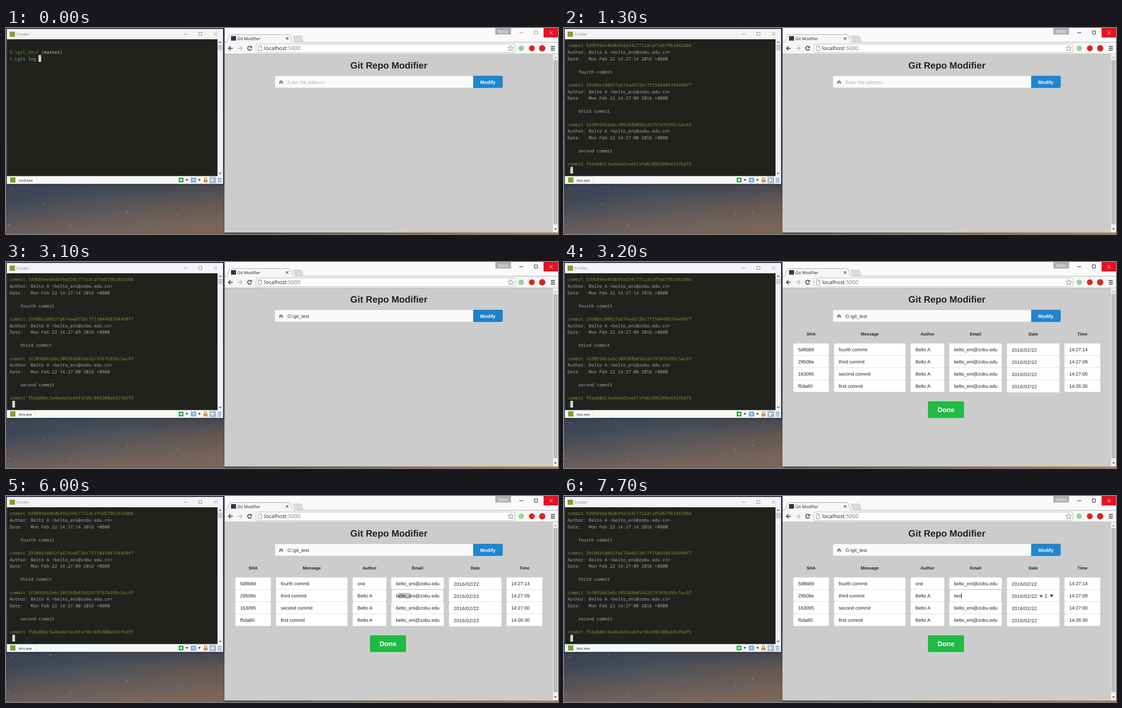
These frames come from a looping animation (1224x457 px, 8000 ms). An HTML page:

```html
<!DOCTYPE html>
<html lang="en">
<head>
<meta charset="utf-8">
<title>Git Repo Modifier</title>
<style>
html, body { margin: 0; width: 100%; height: 100%; overflow: hidden; background: #ccc; }
svg { display: block; --bg: #20221d; --path: #6b9c1c; --bright: #cfcfcb; --cmd: #9d9d99; --log: #a6a6a2; --hash: #868a35; --title: #8c8c90; --btn: #8a8a8e; --bar: #f6f2f5; --web: #8e8e8e; }
svg.term { --bg: #272822; --path: #86cb17; --bright: #f8f8f2; --cmd: #bcbcb6; --log: #c6c6c0; --hash: #a3a632; --title: #222; --btn: #111; --bar: #fff; }
svg.web { --web: #111; }
text { text-rendering: geometricPrecision; white-space: pre; }
.mono { font: 9.75px "Noto Sans Mono", "DejaVu Sans Mono", monospace; }
.ui { font-family: "Open Sans", "Noto Sans", sans-serif; }
.page { font: 10.5px "Liberation Sans", Arial, sans-serif; fill: #222; }
.b { font-weight: bold; }
.mid { text-anchor: middle; }
.line { fill: none; stroke-width: 1; }
.cell { fill: #fff; stroke: #dcdcdc; }
.cell.focus { stroke: #85b7d9; }
.shade { fill: #000; opacity: .3; filter: blur(2px); }
.term .shade { opacity: .6; filter: blur(5px); }
</style>
</head>
<body>
<svg id="stage" width="1224" height="457" viewBox="0 0 1224 457">
  <defs>
    <linearGradient id="sky">
      <stop offset="0" stop-color="#3e4655"/><stop offset=".17" stop-color="#484f59"/>
      <stop offset=".4" stop-color="#55504f"/><stop offset=".7" stop-color="#8a7354"/><stop offset="1" stop-color="#b8944f"/>
    </linearGradient>
    <linearGradient id="dusk" x2="0" y2="1">
      <stop offset="0" stop-color="#20254a"/><stop offset=".75" stop-color="#323a52"/><stop offset="1" stop-color="#323a52" stop-opacity="0"/>
    </linearGradient>
    <linearGradient id="glow" x2=".25" y2="1">
      <stop offset=".3" stop-color="#a07a62" stop-opacity="0"/><stop offset="1" stop-color="#a07a62" stop-opacity=".5"/>
    </linearGradient>
  </defs>

  <!-- wallpaper -->
  <rect width="1224" height="457" fill="url(#sky)"/>
  <rect width="1224" height="380" fill="url(#dusk)"/>
  <rect y="346" width="485" height="111" fill="url(#glow)"/>
  <g id="stars" fill="#c9b58c"></g>

  <!-- browser window -->
  <rect x="484" y="-4" width="742" height="458" fill="#000" opacity=".3" style="filter:blur(2px)"/>
  <rect x="484.5" y="0" width="740" height="453.5" fill="#fafafa"/>
  <path d="M485 31.5H488Q490 31 491 28L495 17Q496 14.5 498.500 14.500H627Q629.500 14.500 630.500 17L635 28Q636 31.500 638 31.500H1224V58H485Z" fill="#f6f6f6"/>
  <path class="line" stroke="#a6a6a6" d="M485 31.5H488Q490 31 491 28L495 17Q496 14.5 498.500 14.500H627Q629.500 14.500 630.500 17L635 28Q636 31.500 638 31.500H1224"/>
  <path d="M636 17.500H653Q655 17.500 656 20L659 29.500H642Q640 29.500 639 27Z" fill="#d6dce0" stroke="#b9bfc3" stroke-width=".8"/>
  <rect x="499" y="18" width="11" height="10" fill="#27394d"/>
  <text class="ui" x="513" y="26.500" font-size="9.2" fill="#222">Git Modifier</text>
  <path class="line" stroke="#555" d="M620.500 20.500L626 26M626 20.500L620.500 26" style="stroke-width:1.3"/>

  <rect x="1085" width="35" height="14.500" fill="#b0b0b0"/>
  <text class="ui mid" x="1102.500" y="11" font-size="9" fill="#fff">Belto</text>
  <path class="line" d="M1138 10.500H1147M1171.500 6.500H1178.500V13.500H1171.500Z" style="stroke:var(--web)"/>
  <rect x="1192" width="32" height="21" fill="#e81123"/>
  <path class="line" stroke="#fff" d="M1205 7L1212 14M1212 7L1205 14"/>

  <path class="line" stroke="#505050" d="M503 45H493.500M498 40.500L493.300 45L498 49.500" style="stroke-width:2"/>
  <path class="line" stroke="#c4c4c4" d="M514 45H523.500M519 40.500L523.700 45L519 49.500" style="stroke-width:2"/>
  <path class="line" stroke="#505050" d="M543.500 42A4.300 4.300 0 1 0 544.300 46.500" style="stroke-width:2"/>
  <path d="M545.500 39.500V44.500H540.500Z" fill="#505050"/>
  <rect x="554.500" y="35.500" width="574" height="19" rx="2" fill="#fff" stroke="#b4b4b4"/>
  <path d="M559.500 39.500H564.500L567.500 42.500V50.500H559.500ZM564.500 39.500V42.500H567.500" fill="#fff" stroke="#808080" stroke-width=".9"/>
  <text class="ui" x="572.500" y="49.300" font-size="11.9" fill="#222">localhost<tspan fill="#777">:5000</tspan></text>
  <path id="star" class="line" stroke="#777"/>
  <circle cx="1142.500" cy="45" r="6" fill="#8fd694"/>
  <circle cx="1166" cy="45" r="6.500" fill="#e2231a"/>
  <circle cx="1189" cy="45" r="7" fill="#d9261c"/>
  <path class="line" stroke="#505050" d="M1208 41H1217M1208 45H1217M1208 49H1217" style="stroke-width:2"/>

  <!-- page -->
  <rect x="485" y="58" width="728" height="395" fill="#ccc"/>
  <path class="line" stroke="#b6b6b6" d="M485 57.500H1224"/>
  <rect x="1213" y="58" width="11" height="395" fill="#f1f1f1"/>
  <rect x="1214" y="71" width="9" height="364.500" fill="#bdbdbd"/>
  <path d="M1215.500 67H1221.500L1218.500 63.500Z" fill="#a0a0a0"/>
  <path d="M1215.500 444.500H1221.500L1218.500 448Z" fill="#505050"/>
  <g class="page">
    <text class="b mid" x="849" y="90" font-size="20.500">Git Repo Modifier</text>
    <path d="M1036 106.500H599Q596.500 106.500 596.500 109V130Q596.500 132.500 599 132.500H1036Z" fill="#fafafa" stroke="#dcdcdc"/>
    <path d="M605 120L610 115.500L615 120L614 120.700V124H611.200V121H608.800V124H606V120.700Z" fill="#888"/>
    <text id="address" x="624" y="123.500"></text>
    <path id="modify" d="M1036 106H1098Q1101.500 106 1101.500 109.500V129.500Q1101.500 133 1098 133H1036Z"/>
    <text class="b mid" x="1068.500" y="123.500" fill="#fff">Modify</text>
    <g id="table" data-on="3200 8000"></g>
    <g id="carets" fill="#111"></g>
  </g>

  <!-- console window -->
  <rect class="shade" x="1" y="4" width="482" height="344"/>
  <rect x="1.500" y="2" width="480" height="344" fill="#f7f7f6" stroke="#55597a" stroke-width=".6"/>
  <rect x="2" y="2.500" width="479" height="22.500" style="fill:var(--bar)"/>
  <rect x="8" y="8" width="12" height="11.500" fill="#7fa12b"/>
  <text class="ui" x="23" y="16.800" font-size="9.2" style="fill:var(--title)">Cmder</text>
  <path class="line" d="M394 13.500H402M427.500 9.500H434.500V16.500H427.500ZM461 9.500L468.500 17M468.500 9.500L461 17" style="stroke:var(--btn)"/>
  <rect x="2" y="25" width="467" height="303.500" style="fill:var(--bg)"/>
  <rect x="469" y="25" width="12" height="303.500" fill="#f0f0f0"/>
  <rect x="470" y="37" width="10.500" height="12.500" fill="#cdcdcd"/>
  <path class="line" stroke="#505050" d="M472.500 33L475 30.500L477.500 33M472.500 321L475 323.500L477.500 321" style="stroke-width:1.4"/>
  <g id="prompt" class="mono" data-on="0 700"></g>
  <g id="log" class="mono" data-on="700 8000"></g>
  <g id="cursors"></g>

  <!-- status bar -->
  <path data-on="0 700" d="M4.500 329V345.500H67.500V330.500H4.500" fill="#fff" stroke="#dcdcdc"/>
  <path data-on="700 8000" d="M4.500 329V345.500H64V330.500H4.500" fill="#fff" stroke="#dcdcdc"/>
  <rect x="9" y="331.500" width="12" height="11.500" fill="#7fa12b"/>
  <text class="ui" id="task" x="28" y="340.700" font-size="8.1" fill="#111"></text>
  <rect x="383" y="332" width="10.500" height="10.500" rx="1" fill="#23a338"/>
  <path class="line" stroke="#fff" d="M385 337.200H391.500M388.200 334V340.500" style="stroke-width:2"/>
  <path d="M398.500 335.500H404L401.200 339ZM426.200 335.500H431.800L429 339Z" fill="#111"/>
  <rect x="410.500" y="332.500" width="10.500" height="9.500" fill="#8fbbe0" stroke="#5b8fc0"/>
  <path class="line" stroke="#fff" d="M414.500 335.500H416V340"/>
  <path class="line" stroke="#a8843a" d="M440 337V334.500A2.500 2.500 0 0 1 445 334.500V337" style="stroke-width:1.4"/>
  <rect x="438" y="336.500" width="9" height="6" fill="#c79a42"/>
  <rect x="451.500" y="330.500" width="14" height="13.500" fill="#cfe4f5" stroke="#8fb8dc"/>
  <path d="M454 333.500H463.500V341.500H454ZM460.500 333.500V341.500" fill="#fff" stroke="#666"/>
  <path class="line" stroke="#2f86c6" d="M469 333.500H478M469 337.500H478M469 341.500H478" style="stroke-width:1.6"/>
</svg>
<script>
const LOOP = 8000;
const $ = id => document.getElementById(id);
const stage = $('stage');
const NAME = 'Belto A', MAIL = 'belto_eni@zobu.edu';

function add(parent, tag, attrs, text) {
  const el = document.createElementNS('http://www.w3.org/2000/svg', tag);
  for (const k in attrs) el.setAttribute(k, attrs[k]);
  if (text) el.textContent = text;
  parent.appendChild(el);
  return el;
}

// Console rows are 14.6 px apart, characters 5.85 px wide.
const row = (box, n, text, color, col = 0) =>
  add(box, 'text', { x: 8 + col * 5.85, y: 42.4 + n * 14.6, style: `fill:var(--${color})` }, text);

row($('prompt'), 1, 'G:\\git_test', 'path');
row($('prompt'), 1, '(master)', 'bright', 12);
row($('prompt'), 2, 'λ', 'c').style.fill = '#75756c';
row($('prompt'), 2, 'cgit log', 'cmd', 2);

[['5d9b89ee46db49a534c771a3caf5eb79b1842dbb', '14', 'fourth'],
 ['29508e18092fa674add726c7f1504488764490f7', '09', 'third'],
 ['163095662e6c309388b05b62679767b395c5ac6f', '00', 'second'],
 ['f5da80dc3a46e4d1ee6fafd6c086300a692fbbf5']].forEach(([sha, sec, nth], i) => {
  const n = i * 6, log = $('log');
  row(log, n, 'commit ' + sha, 'hash');
  if (!nth) return row(log, n + 1, ':', 'log');
  row(log, n + 1, `Author: ${NAME} <${MAIL}.cn>`, 'log');
  row(log, n + 2, `Date:   Mon Feb 22 14:27:${sec} 2016 +0800`, 'log');
  row(log, n + 4, `    ${nth} commit`, 'log');
});

const bar = (box, x, y, w, h, fill, on) =>
  add(box, 'rect', { x, y, width: w, height: h, fill, 'data-on': on });

const cursors = $('cursors');
bar(cursors, 72, 60, 6, 15, '#cfcfcb', '0 200');
bar(cursors, 72, 60, 1, 15, '#fff', '200 600');
bar(cursors, 8, 75, 1.3, 14, '#fff', '600 700');
bar(cursors, 14, 308, 1.2, 15, '#fff', '700 1100');
bar(cursors, 14, 308, 6, 15, '#d4d4d0', '1300 8000');

// Commit table
const table = $('table');
const columns = [
  ['SHA', 508.5, 79, ['5d9b89', '29508e', '163095', 'f5da80']],
  ['Message', 598.5, 159, ['fourth commit', 'third commit', 'second commit', 'first commit']],
  ['Author', 768.5, 75, Array(4).fill(NAME)],
  ['Email', 854, 117, Array(4).fill(MAIL)],
  ['Date', 982, 117, Array(4).fill('2016/02/22')],
  ['Time', 1109.5, 80, ['14:27:14', '14:27:09', '14:27:00', '14:26:30']]
];
const cells = columns.map(([head, x, w, list]) => {
  const date = head === 'Date';
  add(table, 'text', { x: x + w / 2, y: 163.3, class: 'b mid', 'font-size': 9.45 }, head);
  return list.map((value, i) => {
    const y = 180.5 + 27 * i;
    const box = add(table, 'rect', { x, y, width: w, height: date ? 28 : 27, rx: 3, class: 'cell' });
    const marks = add(table, 'g', {});
    const text = add(table, 'text', { x: x + 10.7, y: y + (date ? 18.3 : 17.6) }, value);
    if (date) text.style.letterSpacing = '.36px';
    return { box, marks, text };
  });
});
const author = cells[2][0], email = cells[3][1];

bar(author.marks, 779, 188, 20, 12, '#c4c4c4', '3900 4000');
bar(author.marks, 779, 188, 34, 12, '#c4c4c4', '4000 4800');
bar(email.marks, 869.5, 215, 28.5, 12, '#c4c4c4', '6000 6100');
bar(email.marks, 865, 215, 95.5, 12, '#c4c4c4', '6100 6700');

function dateTools(y, on) {
  const g = add(table, 'g', { 'data-on': on });
  add(g, 'path', { d: `M1055.500 ${y - 2.5}l5 5m0 -5l-5 5`, stroke: '#3a62a0', 'stroke-width': 1.8 });
  add(g, 'path', { d: `M1066 ${y - 1.3}h5.600l-2.800 -3zm0 2.600h5.600l-2.800 3z`, fill: '#555' });
  add(g, 'path', { d: `M1077.500 ${y - 3}h7.500l-3.750 5.500z`, fill: '#111' });
}
dateTools(222, '6300 7600 7700 8000');
dateTools(249, '7600 7700');

add(table, 'rect', { x: 807, y: 309, width: 80, height: 37, rx: 3, fill: '#21ba45' });
add(table, 'text', { x: 847, y: 333, class: 'b mid', 'font-size': 15, fill: '#fff' }, 'Done');

const caret = (x, y, on) => bar($('carets'), x, y, 1, 12, '#111', on);
caret(671, 114, '2000 2400');
caret(791, 188, '4800 4900');
caret(797, 188, '4900 5300 5700 6000');
caret(868, 215, '6700 6900');
caret(875.5, 215, '6900 7100');
caret(881, 215, '7100 7500 7700 8000');

// Bookmark star and wallpaper stars
$('star').setAttribute('d', 'M' + Array.from({ length: 10 }, (_, i) => {
  const r = i % 2 ? 2.9 : 6.6, a = i * Math.PI / 5;
  return `${1119 + r * Math.sin(a)} ${45.3 - r * Math.cos(a)}`;
}).join('L') + 'Z');

[[12, 356], [97, 352], [5, 436], [142, 435], [268, 408], [380, 414], [418, 406], [83, 390]]
  .forEach(([x, y]) => bar($('stars'), x, y, 1.5, 1.5, '#d8bf8a', '0 8000'));
let seed = 7;
const rand = () => (seed = seed * 16807 % 2147483647) / 2147483647;
for (let i = 0; i < 70; i++)
  add($('stars'), 'rect', { x: rand() * 484, y: 348 + rand() * 108, width: 1, height: 1, opacity: .1 + rand() * .3 });

// Timeline
const cues = [...document.querySelectorAll('[data-on]')]
  .filter(el => el.dataset.on !== 'undefined')
  .map(el => [el, el.dataset.on.split(' ').map(Number)]);
const within = (t, a, b) => t >= a && t < b;
const at = (t, steps) => steps.filter(s => s[0] <= t).pop()[1];
const setText = (el, value) => { if (el.textContent !== value) el.textContent = value; };

function draw(t) {
  stage.classList.toggle('term', within(t, 200, 1300));
  stage.classList.toggle('web', t >= 1300);
  for (const [el, spans] of cues) {
    const on = spans.some((s, i) => i % 2 === 0 && within(t, s, spans[i + 1]));
    el.style.display = on ? '' : 'none';
  }
  setText($('task'), t < 700 ? 'cmd.exe' : 'less.exe');
  setText($('address'), t < 2000 ? 'Enter the address' : 'G:\\git_test');
  $('address').style.fill = t < 2000 ? '#b3b3b3' : '#333';
  $('modify').style.fill = within(t, 3000, 3200) ? '#1e80cc' : '#2185d0';
  author.box.classList.toggle('focus', within(t, 3900, 6000));
  email.box.classList.toggle('focus', t >= 6000);
  setText(author.text, at(t, [[0, NAME], [4800, 'on'], [4900, 'one']]));
  setText(email.text, at(t, [[0, MAIL], [6700, 't'], [6900, 'tw'], [7100, 'two']]));
}

const start = performance.now();
function tick() {
  draw((performance.now() - start) % LOOP);
  requestAnimationFrame(tick);
}
draw(0);
requestAnimationFrame(tick);
</script>
</body>
</html>
```
